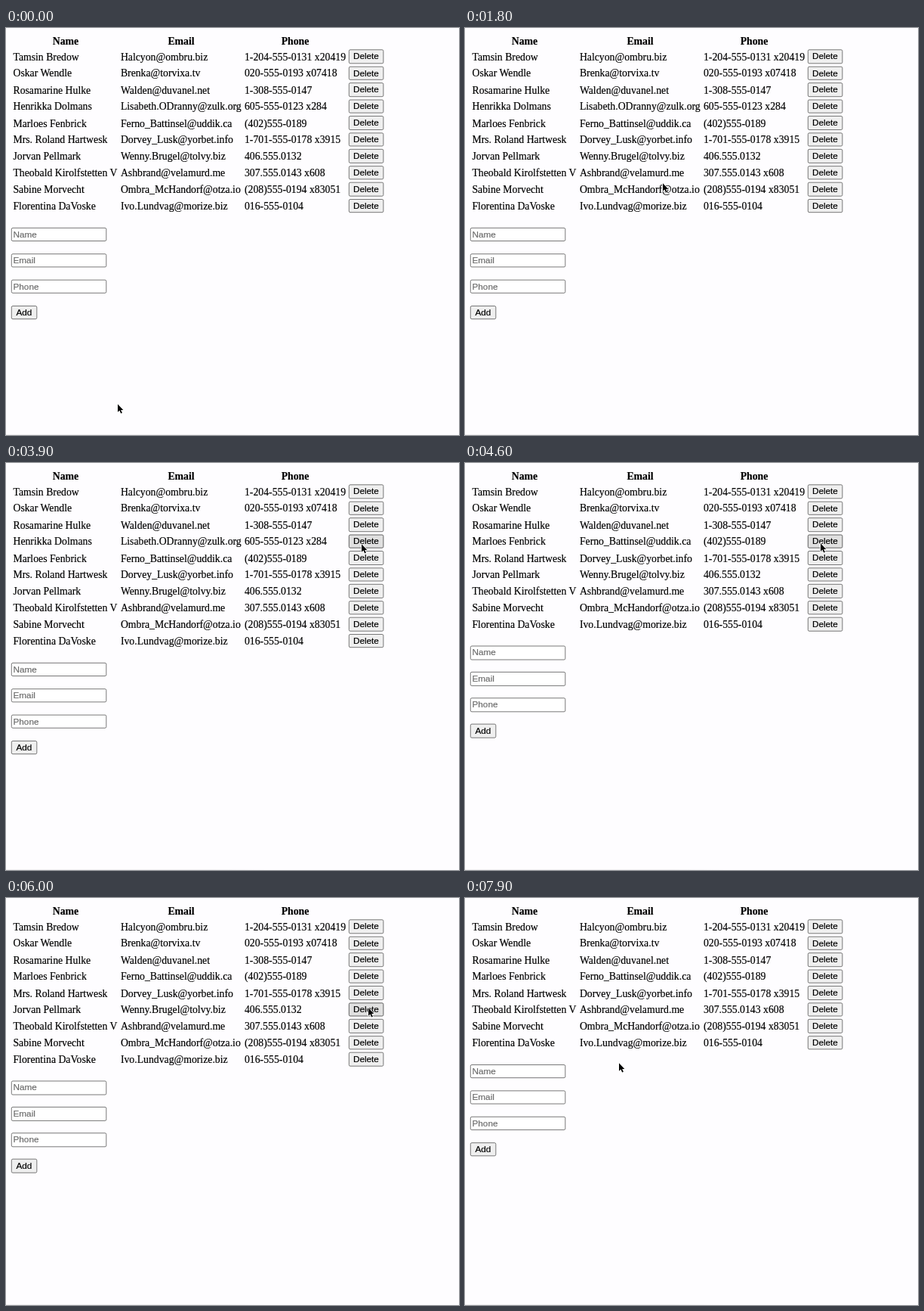
Write an HTML page that moves like this. It is 600 px wide and 538 px high and loops after 8 s.

```html
<!DOCTYPE html>
<html lang="en">
<head>
<meta charset="utf-8">
<title>Contacts</title>
<style>
  html, body { margin: 0; width: 100%; height: 100%; overflow: hidden; background: #fefdff; }
  #page {
    position: absolute; left: 0; top: 0; width: 698px; height: 626px;
    transform: scale(.8596); transform-origin: 0 0;
    font: 16px/18px "Liberation Serif", Times, serif; color: #000; white-space: nowrap;
    -webkit-text-stroke: .2px;
  }
  #page * { position: absolute; }
  .title { top: 12px; font-weight: bold; transform: translateX(-50%); }
  .row { left: 0; }
  .row span { top: 3.7px; }
  #page .button, #page .field {
    box-sizing: border-box; height: 21.5px; border: 1px solid #626262; border-radius: 2.5px;
    font: 13.7px/20px "Liberation Sans", Arial, sans-serif;
  }
  #page .button { background: #efefef; text-align: center; }
  #page .button.hover { background: #e0e0e0; border-color: #4a4a4a; }
  .row .button { left: 527.6px; top: 1px; width: 54.4px; }
  .field { left: 8px; width: 147px; padding-left: 2px; background: #fff; color: #686868; }
  .field + .button { left: 8px; width: 39.7px; }
  #edge {
    position: absolute; left: 0; top: 537px; width: 345px; height: 1px;
    background: linear-gradient(90deg, #f1f0f2 80%, #fefdff);
  }
  #cursor { position: absolute; left: -1px; top: -1px; width: 12px; height: 18px; overflow: visible; }
</style>
</head>
<body>
<div id="page"></div>
<div id="edge"></div>
<svg id="cursor" viewBox="0 0 12 18">
  <path d="M1 1.3V11.7L3.3 9.6 5.2 13.6 6.9 12.8 5.1 8.9H8.3Z" stroke="#fff" stroke-width="1.5" stroke-linejoin="round" paint-order="stroke"/>
</svg>
<script>
const SCALE = 0.8596, ROWS_TOP = 32, ROW_PITCH = 25.5, FIELD_PITCH = 40, FORM_GAP = 19.6;
const LOOP = 8000, TICK = 100;

const columns = [
  { title: "Name", left: 11, center: 91.9 },
  { title: "Email", left: 176.7, center: 269.9 },
  { title: "Phone", left: 367.6, center: 445.6 }
];

const contacts = [
  ["Tamsin Bredow", "Halcyon@ombru.biz", "1-204-555-0131 x20419"],
  ["Oskar Wendle", "Brenka@torvixa.tv", "020-555-0193 x07418"],
  ["Rosamarine Hulke", "Walden@duvanel.net", "1-308-555-0147"],
  ["Henrikka Dolmans", "Lisabeth.ODranny@zulk.org", "605-555-0123 x284"],
  ["Marloes Fenbrick", "Ferno_Battinsel@uddik.ca", "(402)555-0189"],
  ["Mrs. Roland Hartwesk", "Dorvey_Lusk@yorbet.info", "1-701-555-0178 x3915"],
  ["Jorvan Pellmark", "Wenny.Brugel@tolvy.biz", "406.555.0132"],
  ["Theobald Kirolfstetten V", "Ashbrand@velamurd.me", "307.555.0143 x608"],
  ["Sabine Morvecht", "Ombra_McHandorf@otza.io", "(208)555-0194 x83051"],
  ["Florentina DaVoske", "Ivo.Lundvag@morize.biz", "016-555-0104"]
];

// Contact index -> time of deletion
const deletedAt = { 3: 4600, 6: 6600 };

// Where the cursor rests or turns
const stops = [
  { time: 0, x: 148, y: 497 },
  { time: 800, x: 148, y: 497 },
  { time: 1300, x: 351, y: 67 },
  { time: 1700, x: 226, y: 205 },
  { time: 1800, x: 262, y: 205 },
  { time: 2800, x: 262, y: 205 },
  { time: 3700, x: 471, y: 107 },
  { time: 5100, x: 471, y: 106 },
  { time: 5700, x: 480, y: 145 },
  { time: 7600, x: 480, y: 145 },
  { time: 7900, x: 204, y: 218 },
  { time: LOOP, x: 204, y: 218 }
];

const page = document.getElementById("page");
const cursor = document.getElementById("cursor");

function add(parent, tag, className, text = "", style = {}) {
  const node = document.createElement(tag);
  node.className = className;
  node.textContent = text;
  Object.assign(node.style, style);
  return parent.appendChild(node);
}

const form = add(page, "div", "form");
columns.forEach(({ title, center }, i) => {
  add(page, "span", "title", title, { left: center + "px" });
  add(form, "div", "field", title, { top: i * FIELD_PITCH + "px" });
});
add(form, "div", "button", "Add", { top: columns.length * FIELD_PITCH + "px" });

const rows = contacts.map(cells => {
  const row = add(page, "div", "row");
  cells.forEach((text, i) => add(row, "span", "", text, { left: columns[i].left + "px" }));
  return { row, button: add(row, "div", "button", "Delete") };
});

const ease = t => t * t * (3 - 2 * t);

function cursorAt(time) {
  const next = stops.findIndex(stop => stop.time > time);
  const a = stops[next - 1], b = stops[next];
  const k = ease((time - a.time) / (b.time - a.time));
  const mix = (from, to) => Math.round(from + (to - from) * k);
  return [mix(a.x, b.x), mix(a.y, b.y)];
}

function render(elapsed) {
  const time = Math.floor((elapsed % LOOP) / TICK) * TICK;
  const [x, y] = cursorAt(time);
  const px = x / SCALE, py = y / SCALE;
  cursor.style.transform = `translate(${x}px, ${y}px)`;

  let top = ROWS_TOP;
  rows.forEach(({ row, button }, i) => {
    const gone = time >= deletedAt[i];
    row.style.display = gone ? "none" : "";
    if (gone) return;
    row.style.top = top + "px";
    button.classList.toggle("hover", px > 527.6 && px < 582 && py > top + 1 && py < top + 22.5);
    top += ROW_PITCH;
  });
  form.style.top = top + FORM_GAP + "px";
}

const begin = performance.now();
function frame() {
  render(performance.now() - begin);
  requestAnimationFrame(frame);
}
frame();
</script>
</body>
</html>
```
